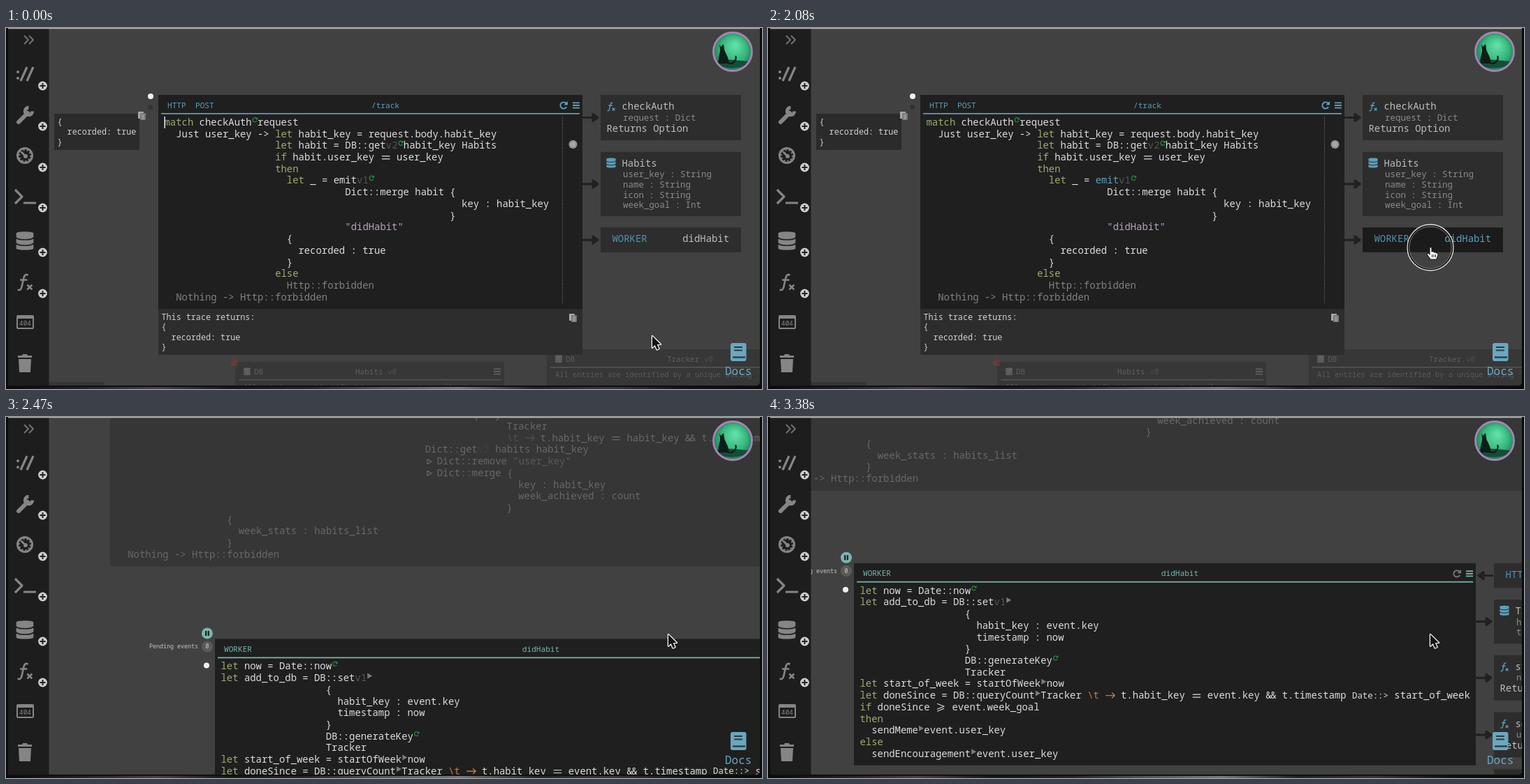
An HTML page with a canvas that plays this animation: 1082 by 518 pixels, repeating every 3770 ms.

```html
<!DOCTYPE html>
<html lang="en">
<head>
<meta charset="utf-8">
<title>Code canvas</title>
<style>
html, body { margin: 0; height: 100%; overflow: hidden; background: #0b0b0b; }
canvas { display: block; }
</style>
</head>
<body>
<canvas id="stage" width="1082" height="518"></canvas>
<script>
const ctx = document.getElementById('stage').getContext('2d');
const LOOP = 3770, TICK = 130, CELL = 8.35, LINE = 16.72;
const BG = '#414141', DARK = '#1f1f1f', BOX = '#2d2d2d', TEXT = '#dcdcdc', GRAY = '#8a8a8a',
  BLUE = '#5b9fb8', TEAL = '#7ab5ae', GREEN = '#9bab6c', ORANGE = '#c07c42';

const trackCode = `match checkAuth↻request
  Just user_key -> let habit_key = request.body.habit_key
                   let habit = DB::getv2↻habit_key Habits
                   if habit.user_key ═ user_key
                   then
                     let _ = emitv1↻
                               Dict::merge habit {
                                                   key : habit_key
                                                 }
                               "didHabit"
                     {
                       recorded : true
                     }
                   else
~                     Http::forbidden
~  Nothing -> Http::forbidden`;

const statsCode = `match checkAuth↻request
  Just user_key -> let week = startOfWeek▸Date::now
                   let habits = DB::queryv4 Habits user_key
                   let habits_list = List::map habits
                                             let count = DB::queryCount▸
${' '.repeat(67)}Tracker
${' '.repeat(67)}\\t → t.habit_key ═ habit_key && t.timestamp
${' '.repeat(53)}Dict::getv2 habits habit_key
${' '.repeat(53)}▷Dict::remove "user_key"
${' '.repeat(53)}▷Dict::merge {
${' '.repeat(69)}key : habit_key
${' '.repeat(69)}week_achieved : count
${' '.repeat(67)}}
                   {
                     week_stats : habits_list
                   }
  Nothing -> Http::forbidden`;

const workerCode = `let now = Date::now↻
let add_to_db = DB::setv1▸
                  {
                    habit_key : event.key
                    timestamp : now
                  }
                  DB::generateKey↻
                  Tracker
let start_of_week = startOfWeek▸now
let doneSince = DB::queryCount▸Tracker \\t → t.habit_key ═ event.key && t.timestamp Date::> start_of_week
if doneSince ⩾ event.week_goal
then
  sendMeme▸event.user_key
else
  sendEncouragement▸event.user_key`;

// drawing helpers
function text(s, x, y, size, color, align = 'left') {
  ctx.font = `${size}px "Noto Sans Mono", monospace`;
  ctx.textAlign = align;
  ctx.fillStyle = color;
  ctx.fillText(s, x, y + size * 0.33);
}
function rect(x, y, w, h, color, r = 0) {
  ctx.fillStyle = color;
  ctx.beginPath();
  ctx.roundRect(x, y, w, h, r);
  ctx.fill();
}
function disc(x, y, r, color) {
  ctx.fillStyle = color;
  ctx.beginPath();
  ctx.arc(x, y, r, 0, 7);
  ctx.fill();
}
function ring(x, y, r, color, width, from = 0, to = 7) {
  ctx.strokeStyle = color;
  ctx.lineWidth = width;
  ctx.beginPath();
  ctx.arc(x, y, r, from, to);
  ctx.stroke();
}
// SVG path placed at x, y; width 0 fills it
function path(d, x, y, color, width = 0, scale = 1) {
  ctx.save();
  ctx.translate(x, y);
  ctx.scale(scale, scale);
  ctx.lineWidth = width;
  ctx.lineJoin = 'round';
  ctx.fillStyle = ctx.strokeStyle = color;
  width ? ctx.stroke(new Path2D(d)) : ctx.fill(new Path2D(d));
  ctx.restore();
}

// icons
function refresh(x, y, r, color) {
  ring(x, y, r, color, r * 0.42, 0.5, 5.6);
  path('M1.3 -1.3V-.1H.1Z', x, y, color, 0, r);
}
const menu = (x, y, color) => path('M-5 -3.7H5M-5 0H5M-5 3.7H5', x, y, color, 1.8);
const fx = (x, y, s, color) =>
  path('M4 -9C0 -11 -1 -8 -2 -3L-4 6C-5 10 -7 10 -9 9M-6 -3H3M3 3L9 9M9 3L3 9', x, y, color, 2.3, s);
function database(x, y, s, color) {
  for (const dy of [-8, 0, 8])
    path('M-12 -3C-12 -6 12 -6 12 -3V2C12 5 -12 5 -12 2Z', x, y + dy * s, color, 0, s);
  path('M-12 -4.5C-9 -1.5 9 -1.5 12 -4.5M-12 3.5C-9 6.5 9 6.5 12 3.5', x, y, DARK, 1.5, s);
}
function clipboard(x, y) {
  rect(x - 5, y - 6, 8, 10, '#aaa', 1);
  rect(x - 2, y - 4, 8, 10, '#777', 1);
  path('M0 -1H4M0 1.5H4M0 4H4', x, y, '#bbb', 1);
}

// code: special glyphs return their advance
const glyphs = {
  '↻': (x, y) => (refresh(x + 4.5, y - 3.5, 3, '#1f8f3c'), CELL),
  '▸': (x, y) => (path('M1 -7L8 -3L1 1Z', x, y, '#7a7a7a'), CELL),
  '▷': (x, y) => (path('M3 -3L9 .5L3 4Z', x, y, TEXT, 1.2), 2 * CELL),
  '═': (x, y) => (path('M2.5 -1.5H14M2.5 2.5H14', x, y, TEXT, 1.2), 15.2),
  '⩾': (x, y) => (path('M2 -5L12 -1L2 3M2 6L12 2', x, y, TEXT, 1.2), 15),
  '→': (x, y) => (path('M1 0H14M10 -4L14 0L10 4', x, y, ORANGE, 1.3), 14.4),
  '&&': (x, y) => (text('&', x, y, 13.92, TEXT), text('&', x + 7, y, 13.92, TEXT), 15.2),
  'Date::>': (x, y) => (text('Date::>', x, y, 12.4, TEXT), 52)
};
const TOKENS = /(\b(?:let|if|then|else|match)\b|"\w+"|v\d(?=[ ↻▸])|\\t|emit|Date::>|&&|[↻▸▷═⩾→])/;
function tokenColor(s, hover) {
  if (/^(let|if|then|else|match)$/.test(s)) return GREEN;
  if (s[0] === '"') return '#b3a2c0';
  if (/^v\d$/.test(s)) return '#555';
  if (s === '\\t') return ORANGE;
  return s === 'emit' && hover ? BLUE : TEXT;
}
function code(source, x, y, hover) {
  source.split('\n').forEach((line, row) => {
    const dim = line[0] === '~';
    let cx = x;
    for (const s of line.slice(dim ? 1 : 0).split(TOKENS)) {
      const cy = y + row * LINE;
      if (glyphs[s]) { cx += glyphs[s](cx, cy); continue; }
      text(s, cx, cy, 13.92, dim ? '#808080' : tokenColor(s, hover));
      cx += s.length * CELL;
    }
  });
}

// canvas items
function editor({ x, y, w, h, labels, title, source, color }, active, hover) {
  rect(x, y, w, h, DARK, active ? 0 : 3);
  labels.forEach((s, i) => text(s, x + 13 + i * 40, y + 15, 11.1, color));
  text(title, x + w / 2 + 21.5, y + 15, 11.1, color, 'center');
  rect(x + 4, y + 26, w - 8, 1.8, color);
  refresh(x + w - 27, y + 15, 4.6, labels[1] ? color : '#777');
  menu(x + w - 9, y + 15, color);
  code(source, x + 8.5, y + 39.3, hover);
}
function table(x, y, h, name, rows, lockColor) {
  rect(x, y, 385, h, '#222', 3);
  rect(x - 6, y - 2, 10, 8, lockColor, 1);
  ring(x - 1, y - 3, 3, lockColor, 1.6, Math.PI, 7);
  database(x + 17, y + 14, 0.42, '#bbb');
  text('DB', x + 27, y + 14, 11, '#bbb');
  text(name, x + 172, y + 14, 11, '#bbb');
  text('.v0', x + 172 + name.length * 6.6, y + 14, 11, '#888');
  menu(x + 375, y + 14, '#bbb');
  rect(x + 5, y + 25, 376, 1.6, '#a39a9a');
  text('All entries are identified by a unique string `key`.', x + 12, y + 36.5, 10.43, '#aaa');
  rows.forEach(([key, type], i) => {
    text(key, x + 32, y + 57.5 + 24 * i, 10.43, '#bbb');
    text(type, x + 207, y + 57.5 + 24 * i, 10.43, '#bbb');
  });
}
// stacked reference boxes to the right of an editor
function references(x, y, refs, hover) {
  for (const { kind, name, fields = [], returns, caller } of refs) {
    const handler = kind === 'WORKER' || kind === 'HTTP';
    const h = handler ? 35.5 : returns ? 65 : 34 + 14.6 * fields.length;
    rect(x, y, 201, h, hover && handler ? '#1b1b1b' : BOX);
    path(caller ? 'M-1 0H-16M-15 -5L-22 0L-15 5Z' : 'M-26 0H-10M-11 -5L-4 0L-11 5Z', x, y + h / 2, '#212121', 3.2);
    path(caller ? 'M-15 -5L-22 0L-15 5Z' : 'M-11 -5L-4 0L-11 5Z', x, y + h / 2, '#212121');
    if (handler) {
      text(kind, x + 16.5, y + 16.5, 13.92, '#4f94ad');
      text(name, x + 184, y + 16.5, 13.92, hover ? BLUE : '#bbb', 'right');
    } else {
      kind === 'db' ? database(x + 15, y + 16, 0.55, BLUE) : fx(x + 15, y + 17, 0.6, BLUE);
      text(name, x + 30.5, y + 16.5, 13.92, '#bbb');
      fields.forEach((s, i) => text(s, x + 32, y + 32.5 + 14.6 * i, 12.45, GRAY));
      if (returns) text('Returns ' + returns, x + 8.5, y + 48, 13.92, '#bbb');
    }
    y += h + 16.7;
  }
}

const track = { x: 218, y: 96, w: 607, h: 307, labels: ['HTTP', 'POST'], title: '/track', source: trackCode, color: BLUE };
const stats = { x: 1209, y: 545, w: 1200, h: 324, labels: ['HTTP', 'GET'], title: '/stats', source: statsCode, color: BLUE };
const worker = { x: 1359, y: 973, w: 890, h: 290, labels: ['WORKER'], title: 'didHabit', source: workerCode, color: TEAL };
const trackRefs = [
  { kind: 'fn', name: 'checkAuth', fields: ['request : Dict'], returns: 'Option' },
  { kind: 'db', name: 'Habits', fields: ['user_key : String', 'name : String', 'icon : String', 'week_goal : Int'] },
  { kind: 'WORKER', name: 'didHabit' }
];
const workerRefs = [
  { kind: 'HTTP', name: '/track', caller: true },
  { kind: 'db', name: 'Tracker', fields: ['habit_key : String', 'timestamp : Date'] },
  { kind: 'fn', name: 'startOfWeek', fields: ['now : Date'], returns: 'Date' },
  { kind: 'fn', name: 'sendMeme', fields: ['user_key : String'], returns: 'Dict' },
  { kind: 'fn', name: 'sendEncouragement', fields: ['user_key : String'], returns: 'Dict' }
];

function trackExtras(hover, caret) {
  rect(218, 403, 607, 66, BOX);
  ['This trace returns:', '{', '  recorded: true', '}'].forEach((s, i) => text(s, 222.5, 415 + 14.5 * i, 11.75, '#d0d0d0'));
  clipboard(811, 416);
  ctx.setLineDash([1, 1.5]);
  path('M0 127V395', 796.5, 0, '#777', 1);
  ctx.setLineDash([]);
  rect(69, 123, 122, 52, '#2b2b2b');
  ['{', '  recorded: true', '}'].forEach((s, i) => text(s, 73.5, 135 + 14.5 * i, 11.75, '#d0d0d0'));
  clipboard(194, 126);
  disc(207, 98, 4, '#f2f2f2');
  disc(206.5, 113.5, 3.6, '#333');
  references(851, 96, trackRefs.slice(0, 2));
  references(851, 286.3, trackRefs.slice(2), hover);
  if (caret) rect(226.5, 127, 1.3, 17, '#fff');
}
function workerExtras() {
  const { x, y, w } = worker;
  disc(x - 11, y - 8, 8, TEAL);
  rect(x - 14, y - 11.5, 2.3, 7, '#222');
  rect(x - 10.3, y - 11.5, 2.3, 7, '#222');
  text('Pending events', x - 94, y + 11, 8.35, '#c4c4c4');
  disc(x - 11, y + 11, 8, '#5a5a5a');
  text('0', x - 11, y + 11, 8.3, '#ccc', 'center');
  disc(x - 12, y + 38, 4, '#eee');
  references(x + w + 26, y, workerRefs);
}

function sidebar() {
  const c = '#858585';
  rect(3, 1, 58.5, 512, '#1d1d1d');
  path('M-6 -6L0 0L-6 6M1 -6L7 0L1 6', 32, 17, '#6e6e6e', 2.2);
  disc(17, 63, 2, c);
  disc(17, 72, 2, c);
  path('M-6 10L3 -10M3 10L12 -10', 27, 66, c, 3.2);
  ctx.lineCap = 'round';
  path('M-9 10L4 -3', 27, 125, c, 6);
  ctx.lineCap = 'butt';
  ring(32.5, 119.5, 5.2, c, 5, 0, 4.7);
  ring(27, 183, 10.5, c, 3);
  ctx.setLineDash([2, 3]);
  ring(27, 183, 8, c, 2);
  ctx.setLineDash([]);
  path('M-5 -5L1 1', 27, 183, c, 3);
  disc(28, 184, 3, c);
  path('M-14 -10L-4 0L-14 10M-2 9H16', 27, 242, c, 3.2);
  database(27, 306, 1.03, c);
  fx(27, 365, 1.15, c);
  rect(15, 412, 25, 20, c, 2);
  rect(17, 417, 21, 13, '#1d1d1d');
  text('404', 27.5, 423.5, 9.5, c, 'center');
  path('M-10 -12H-4L-3 -14H3L4 -12H10V-9H-10ZM-9 -7H9L8 12H-8Z', 27, 482, c);
  for (const y of [83, 141, 200, 258, 322, 381]) {
    disc(52.5, y, 6.4, '#cfcfcf');
    path('M-4 0H4M0 -4V4', 52.5, y, '#222', 2);
  }
}
function docs() {
  rect(1037, 452, 22.5, 26, '#69a8c0', 3);
  path('M5 6H17M5 10.5H17', 1037, 452, '#303a3e', 1.8);
  path('M3 20.5H21', 1037, 452, '#303a3e', 2.4);
  text('Docs', 1029, 492.5, 16, '#69a8c0');
}
function avatar() {
  const g = ctx.createRadialGradient(1044, 24, 2, 1040, 34, 30);
  g.addColorStop(0, '#62dfa6');
  g.addColorStop(0.6, '#35b67c');
  g.addColorStop(1, '#1d7450');
  disc(1040, 34, 28, g);
  path('M-24 14C-10 9 8 13 24 14C17 26 -16 28 -24 14Z', 1040, 34, '#174c39');
  path('M-19 -11L-17 -7L-13 -11L-12 -4C-12 0 -6 6 -5 17H-20C-22 8 -17 2 -18 -4Z', 1040, 34, '#0d1d18');
  path('M-7 16C2 20 6 10 4 6', 1040, 34, '#0d1d18', 2.2);
  ring(1040, 34, 27.5, '#a982b3', 2.8);
}
function windowFrame() {
  const g = ctx.createLinearGradient(0, 0, 1082, 0);
  ['#080808', '#242022', '#4a4043', '#151515', '#262324', '#555', '#777', '#222', '#3a3638', '#111', '#080808']
    .forEach((c, i) => g.addColorStop(i / 10, c));
  rect(0, 513, 1082, 5, g);
  rect(0, 513, 1082, 2, '#101010');
  rect(0, 0, 3, 518, '#0b0b0b');
  rect(1079, 0, 3, 518, '#0b0b0b');
  rect(3, 0, 1076, 1.3, '#b4b4b4');
}

// motion
const CAMERA = [[2080, 0], [2210, 146], [2340, 600], [2470, 1060], [2600, 1211], [2730, 1233], [2860, 1236]];
const POINTER_X = [[0, 925], [1170, 946], [1430, 948]];
const POINTER_Y = [[0, 442], [1170, 320], [1430, 312]];
function track1d(points, t, ease = p => p) {
  const i = points.findIndex(([at]) => at > t);
  if (i < 0) return points[points.length - 1][1];
  if (i === 0) return points[0][1];
  const [t0, a] = points[i - 1], [t1, b] = points[i];
  return a + (b - a) * ease((t - t0) / (t1 - t0));
}
const smooth = p => p * p * (3 - 2 * p);

function pointer(t, hover) {
  const x = track1d(POINTER_X, t, smooth), y = track1d(POINTER_Y, t, smooth);
  if (!hover) {
    const arrow = 'M0 0V16.5L3.8 13L6.6 19.5L9.6 18.2L6.8 11.9H12Z';
    path(arrow, x, y, '#fff', 2.4);
    path(arrow, x, y, '#141414');
    return;
  }
  if (t >= 2080) {
    ring(948, 315, 31.6, '#171717', 2.5);
    ring(948, 315, 33, '#e0e0e0', 1.3);
    ring(948, 315, 30.2, '#8d8d8d', 0.8);
  }
  const hand = 'M-1 1C-1 -1 2 -1 2 1V6C4 5 5 6 5.5 7C7 6 8 7 8.5 8C10 7 11 8 11 10C11 13 9 14 9 17H0C-1 14 -5 11 -5 9C-4 7 -2 9 -1 10Z';
  path(hand, x, y + 3, '#fff');
  path(hand, x, y + 3, '#151515', 1.1);
  path('M2.5 10V14M5 10V14M7.5 10V14', x, y + 3, '#151515', 1);
}

function draw(t) {
  const hover = t >= 1950 && t < 2210, moved = t >= 2210;
  const caret = t < 1560 && Math.floor(t / 520) % 2 === 0;
  const cam = track1d(CAMERA, t);
  ctx.globalAlpha = 1;
  rect(0, 0, 1082, 518, '#0b0b0b');
  ctx.save();
  ctx.beginPath();
  ctx.roundRect(3, 1, 1076, 512, [0, 0, 5, 5]);
  ctx.clip();
  rect(3, 1, 1076, 512, BG);
  ctx.translate(-cam, -cam * 0.6175);

  ctx.globalAlpha = 0.3;
  rect(40, 508, 101, 90, DARK, 3);
  table(328, 479, 158, 'Habits', [['user_key', 'String'], ['name', 'String'], ['icon', 'String'], ['week_goal', 'Int']],
    moved ? '#c58a3a' : '#c0302c');
  table(774, 461, 103, 'Tracker', [['habit_key', 'String'], ['timestamp', 'Date']], moved ? '#c58a3a' : '#555');
  editor(stats);
  ctx.globalAlpha = !moved ? 1 : t < 2340 ? 0.38 : 0.3;
  editor(track, !moved, t >= 1950);
  disc(811.5, 167, 6, '#a8a8a8');
  ring(811.5, 167, 4.6, '#777', 1);
  if (!moved) trackExtras(hover, caret);
  ctx.globalAlpha = moved ? 1 : 0.3;
  editor(worker, moved);
  if (moved) workerExtras();
  ctx.restore();

  ctx.globalAlpha = 1;
  sidebar();
  docs();
  avatar();
  windowFrame();
  pointer(t, hover);
}

function frame(now) {
  draw(Math.floor(now % LOOP / TICK) * TICK);
  requestAnimationFrame(frame);
}
requestAnimationFrame(frame);
</script>
</body>
</html>
```
